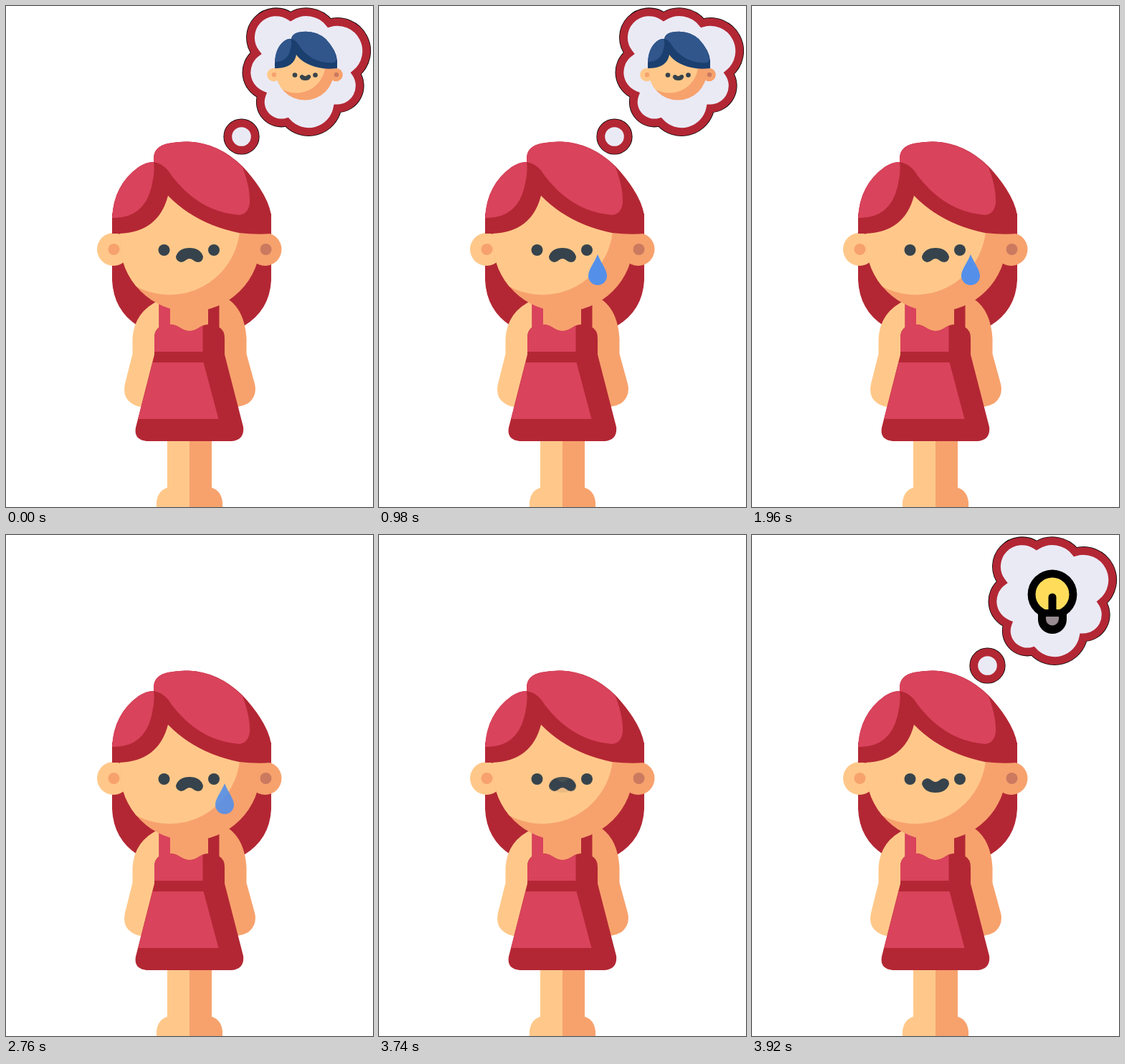
Animation, 512 px wide and 700 px high, one loop 4720 ms. Source, as an HTML page:

```html
<!DOCTYPE html>
<html lang="en">
<head>
<meta charset="utf-8">
<title>Thinking girl</title>
<style>
  html, body { margin: 0; width: 100%; height: 100%; overflow: hidden; background: #fff; }
  svg { display: block; width: 100vw; height: 100vh; }
  .light { fill: #d9435c; }
  .dark { fill: #b32734; }
  .skin { fill: #ffc88a; }
  .shade { fill: #f7a26d; }
  .blush { fill: #cb7a60; }
  .ink { fill: #36434c; }
  .navy { fill: #1b3f6f; }
  .blue { fill: #30568c; }
  .edge { fill: none; stroke: #000; stroke-width: 12.6; }
  .ring { fill: #eaeaf5; stroke: #b32734; stroke-width: 11; }
  .mouth { isolation: isolate; }
  #happy { mix-blend-mode: plus-lighter; }
</style>
</head>
<body>
<svg viewBox="0 0 512 700">
  <defs>
    <path id="lips" class="ink" d="M244 358Q237 356 237 350Q241 338 256 338Q271 338 275 350Q275 357 268 358Q264 358 261 355Q256 351 251 355Q248 358 244 358Z"/>
    <path id="puff" d="M349 66A35.4 35.4 0 0 1 397 15A41 41 0 0 1 451 24A40.4 40.4 0 0 1 488 94A31.5 31.5 0 0 1 462 143A40.5 40.5 0 0 1 392 162A29 29 0 0 1 357 124A33.7 33.7 0 0 1 349 66Z"/>
    <circle id="dot" cx="328.5" cy="182.5" r="18.8"/>
    <path id="face" d="M159 310L226 240L355 310V329A98 98 0 0 1 159 329Z"/>
    <path id="manFace" d="M376.5 84L405 60L457.5 84V91A40.5 40.5 0 0 1 376.5 91Z"/>
    <clipPath id="inFace"><use href="#face"/></clipPath>
    <clipPath id="inManFace"><use href="#manFace"/></clipPath>
  </defs>

  <g id="cloud">
    <g class="edge"><use href="#puff"/><use href="#dot"/></g>
    <g class="ring"><use href="#puff"/><use href="#dot"/></g>
  </g>

  <g id="man">
    <circle class="skin" cx="373.5" cy="96" r="9.3"/>
    <circle class="shade" cx="460.5" cy="96" r="9.3"/>
    <circle class="shade" cx="374" cy="96" r="3.2"/>
    <circle class="blush" cx="461" cy="96" r="3.2"/>
    <use href="#manFace" class="shade"/>
    <circle class="skin" cx="405" cy="81" r="40.5" clip-path="url(#inManFace)"/>
    <path class="navy" d="M375 87Q374 60 388 49Q394 45 398 46Q399 40 407 37Q430 32 446 46Q461 62 462 76V87Q447 89 436 86Q414 81 405 68Q402 86 378 87Z"/>
    <path class="blue" d="M398 46Q399 39 407 37Q430 32 446 46Q459 60 461 74Q461 79 454 79.5Q424 79 408 54Q404 47 398 46Z"/>
    <path class="blue" d="M375 78Q376 58 388 49Q394 45 397.5 46.5Q399 52 397 60Q393 78 375 78Z"/>
    <circle class="ink" cx="403" cy="96.5" r="3.3"/>
    <circle class="ink" cx="431.5" cy="96.5" r="3.3"/>
    <use href="#lips" transform="translate(417.5 100) scale(.41 -.41) translate(-256 -348)"/>
  </g>

  <g id="bulb">
    <circle cx="419" cy="83" r="34.4"/>
    <circle cx="419" cy="83" r="23.5" fill="#ffdd5b"/>
    <path d="M399 104H439V118A20 20 0 0 1 399 118ZM413.5 106V87A5.5 5.5 0 0 1 424.5 87V106Z"/>
    <path d="M410 114H428V117.5A9 9 0 0 1 410 117.5Z" fill="#988b91"/>
  </g>

  <path class="dark" d="M148 290V383Q150 425 184 447H332Q368 425 370 383V290Z"/>
  <path class="skin" d="M214 411Q179 427 176.500 464V486L166 528Q162 547 175 555Q182 560 190 560L235 490V411Z"/>
  <path class="shade" d="M312 411Q333 427 335.500 464V486L347 528Q351 545 338 555Q331 559 323 560L280 490V411Z"/>
  <path class="shade" d="M225 400H288V460H225Z"/>
  <path class="skin" d="M225 600H256V700H210V693Q212 677 225 673Z"/>
  <path class="shade" d="M287 600H256V700H302V693Q300 677 287 673Z"/>
  <path class="dark" d="M213.500 410H229V445Q236 445 242 449Q256 459 270 449Q276 445 282 445V410H297.500V449Q305 453 305 464V487L331 588Q333 606 315 608H196Q178 606 181 589L207 487V464Q207 453 213.500 449Z"/>
  <path class="light" d="M213.500 410H229V445Q236 445 242 449Q256 459 270 449L274.500 446.500V483H207V464Q207 453 213.500 449ZM204.500 498H275.500L296.500 577H184.300Z"/>

  <circle class="skin" cx="150" cy="340" r="23"/>
  <circle class="shade" cx="361.500" cy="340" r="23"/>
  <circle class="shade" cx="150.500" cy="340" r="8"/>
  <circle class="blush" cx="362.500" cy="340" r="8"/>
  <use href="#face" class="shade"/>
  <circle class="skin" cx="228" cy="305" r="98.500" clip-path="url(#inFace)"/>
  <path class="dark" d="M148 297Q150 250 185 225Q197 217 207 218L206 212Q207 196 226 192Q285 180 330 224Q365 262 370 292V318Q350 320 325 317Q265 305 226 265Q213 316 158 318H148Z"/>
  <path class="light" d="M206 218V212Q207 196 226 192Q285 180 330 225Q341 255 340 275Q338 291 325 292Q270 288 231 237Q222 221 206 218Z"/>
  <path class="light" d="M148 296Q150 250 185 225Q196 218 206 218Q208 231 204 248Q195 295 152 296Z"/>
  <circle class="ink" cx="220.500" cy="341" r="8"/>
  <circle class="ink" cx="290" cy="341" r="8"/>
  <g class="mouth">
    <use id="sad" href="#lips"/>
    <use id="happy" href="#lips" transform="translate(0 698) scale(1 -1)"/>
  </g>
  <path id="tear" fill="#5490ea" d="M305 347C309 358 318 368 318 377A13 13 0 0 1 292 377C292 368 301 358 305 347Z"/>
</svg>
<script>
  const LOOP = 4720, STEP = 20, STEPS = 10;
  const part = id => document.getElementById(id);
  const [cloud, man, bulb, sad, happy, tear] =
    ['cloud', 'man', 'bulb', 'sad', 'happy', 'tear'].map(part);

  // Stepped fade from 0 to 1; the first step shows at once.
  const fade = (t, start) =>
    Math.min(STEPS, Math.max(0, Math.floor((t - start) / STEP) + 1)) / STEPS;
  const show = (el, on) => el.setAttribute('visibility', on ? 'visible' : 'hidden');

  function draw(t) {
    const smile = fade(t, 3740);
    // Thoughts pop in and out halfway through their fade.
    const manOn = fade(t, 1780) <= 0.5, bulbOn = smile >= 0.5;
    show(cloud, manOn || bulbOn);
    show(man, manOn);
    show(bulb, bulbOn);
    tear.setAttribute('opacity', fade(t, 800) - fade(t, 2760));
    sad.setAttribute('opacity', 1 - smile);
    happy.setAttribute('opacity', smile);
  }

  const begin = performance.now();
  function tick() {
    draw((performance.now() - begin) % LOOP);
    requestAnimationFrame(tick);
  }
  tick();
</script>
</body>
</html>
```
